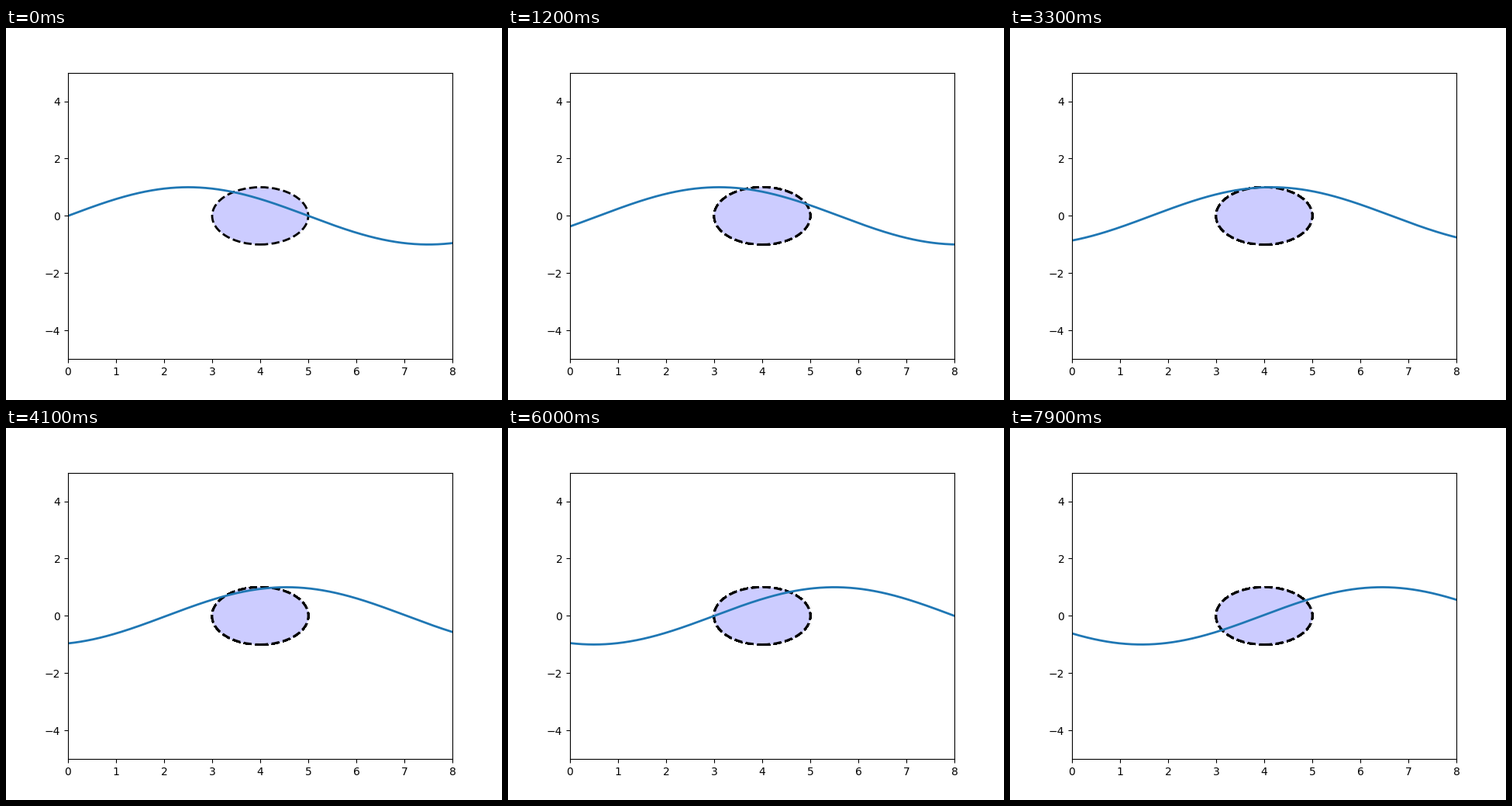
A matplotlib script that plays this animation: 640 by 480 pixels, repeating every 8 s.

```python
import matplotlib.pyplot as plt
import numpy as np
from matplotlib.animation import FuncAnimation
from matplotlib.patches import Ellipse

FRAMES = 80
INTERVAL = 100
WAVELENGTH = 10
STEP = 0.05  # shift of the wave per frame

fig = plt.figure(figsize=(6.4, 4.8), dpi=100)
ax = fig.add_subplot(xlim=(0, 8), ylim=(-5, 5))

x = np.linspace(0, 8, 1000)
wave, = ax.plot(x, np.zeros_like(x), lw=2)


def add_disc():
    return ax.add_patch(Ellipse((4, 0), 2, 2, fc=(0.8, 0.8, 1), ec="black",
                                ls="--", lw=2))


# One more disc is stacked per frame, which hardens the dashed outline.
discs = [add_disc() for _ in range(FRAMES)]


def update(k):
    wave.set_ydata(np.sin(2 * np.pi * (x - STEP * k) / WAVELENGTH))
    for i, disc in enumerate(discs):
        disc.set_visible(i <= k)
    return [wave, *discs]


anim = FuncAnimation(fig, update, frames=FRAMES, interval=INTERVAL,
                     init_func=lambda: update(0), repeat=True, repeat_delay=0)
plt.show()
```
